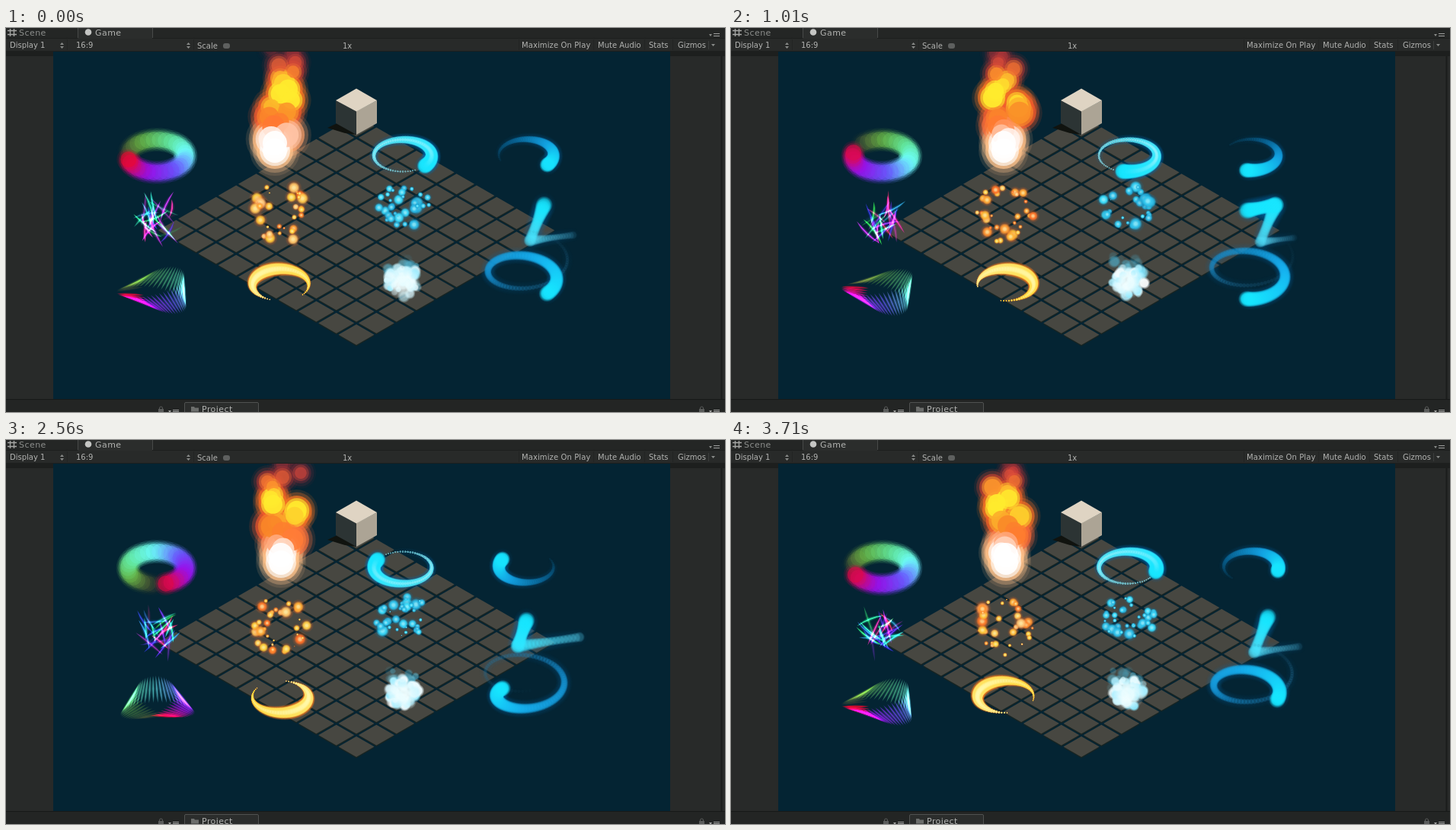
An HTML page with a canvas that plays this animation: 944 by 504 pixels, repeating every 3.81 s.

```html
<!DOCTYPE html>
<html lang="en">
<head>
<meta charset="utf-8">
<title>Particle effects</title>
<style>
html, body { margin: 0; width: 100%; height: 100%; overflow: hidden; background: #282a29; }
svg, canvas { position: absolute; left: 0; top: 0; width: 944px; height: 504px; display: block; }
text { font: 10px "DejaVu Sans", sans-serif; fill: #b2b3b1; }
.tab { font-size: 11px; letter-spacing: .45px; }
</style>
</head>
<body>
<svg viewBox="0 0 944 504">
  <rect width="944" height="504" fill="#282a29"/>
  <rect width="944" height="13" fill="#242625"/>
  <rect x="95" width="97" height="14" fill="#2b2d2c"/>
  <path d="M94.500 0V13M192.500 0V13" stroke="#484a49"/>
  <path d="M0 13.500H94M192 13.500H944" stroke="#1d1f1e"/>
  <rect y="30" width="944" height="7" fill="#1d1f1e"/>
  <path d="M939.500 37V488" stroke="#1b1d1c" stroke-width="2"/>
  <path d="M80.500 15V29M246.500 15V29M673.500 15V29M771.500 15V29M838.500 15V29M875.500 15V29" stroke="#222423"/>
  <path d="M5.500 1V11M10.500 1V11M2 3.500H14M2 8.500H14" stroke="#a8a9a7" stroke-width="1.300"/>
  <circle cx="108" cy="5.500" r="4.300" fill="#c5c6c4"/>
  <text class="tab" x="17" y="10" style="fill:#8d8f8d">Scene</text>
  <text class="tab" x="117" y="10">Game</text>
  <text x="5" y="26">Display 1</text>
  <text x="92" y="26">16:9</text>
  <text x="251" y="27">Scale</text>
  <text x="442" y="27">1x</text>
  <text x="677" y="26" letter-spacing=".1">Maximize On Play</text>
  <text x="777" y="26">Mute Audio</text>
  <text x="844" y="26">Stats</text>
  <text x="882" y="26">Gizmos</text>
  <path d="M71 22l2.500-3 2.500 3zm0 2h5l-2.500 3zM237 22l2.500-3 2.500 3zm0 2h5l-2.500 3zM926 21h5l-2.500 3zM923 8h4l-2 3z" fill="#888a88"/>
  <path d="M929 7.500H937M929 10.500H937" stroke="#a0a1a0"/>
  <path d="M922.500 17V28" stroke="#3c3e3d"/>
  <rect x="285" y="20" width="9" height="7" rx="3" fill="#5e605f"/>
  <rect x="62" y="31" width="810" height="456" fill="#042433"/>
  <g id="floor"></g>
  <path d="M422 131L439 123L460 131V140L445 138Z" fill="#10130f"/>
  <path d="M433 95L460 109V140L433 125Z" fill="#2c3434"/>
  <path d="M487 95L460 109V140L487 125Z" fill="#aca495"/>
  <path d="M460 79.500L487 95L460 109.500L433 95Z" fill="#dfd4c3"/>
  <rect y="487" width="944" height="17" fill="#232524"/>
  <path d="M0 487.500H944" stroke="#171918"/>
  <path d="M234.500 504V493Q234.500 491.500 236 491.500H330Q331.500 491.500 331.500 493V504" fill="#2b2d2c" stroke="#505251"/>
  <path d="M243 497h4l1 1.500h5v5h-10z" fill="#6c6e6c"/>
  <text class="tab" x="257" y="504">Project</text>
  <g fill="none" stroke="#5a5c5b"><path d="M201.500 501V499a2 2 0 0 1 4 0V501M911.500 501V499a2 2 0 0 1 4 0V501"/></g>
  <path d="M200 500h7v4h-7zM910 500h7v4h-7z" fill="#5a5c5b"/>
  <path d="M213 502h4l-2 3zM923 502h4l-2 3z" fill="#a0a1a0"/>
  <path d="M219 501.500H227M219 503.500H227M929 501.500H937M929 503.500H937" stroke="#a0a1a0"/>
</svg>
<canvas width="944" height="504"></canvas>
<script>
const LOOP = 3810, HOLD = 3710, RAD = Math.PI / 180;
const ctx = document.querySelector("canvas").getContext("2d");

// Floor tiles
let tiles = "";
for (let s = 0; s <= 18; s++) for (let i = Math.max(0, s - 9); i <= Math.min(9, s); i++) {
  const x = 460 + (2 * i - s) * 26.3, y = 129 + s * 15.2;
  const diamond = dy => `M${x - 23.5} ${y + dy}l23.5-13.5 23.5 13.5-23.5 13.5z`;
  tiles += `<path d="${diamond(1.3)}" fill="#182422"/><path d="${diamond(-.2)}" fill="#474741"/>`;
}
document.getElementById("floor").innerHTML = tiles;

const rnd = (a, b, c) => {
  const v = Math.sin(a * 127.1 + b * 311.7 + c * 74.7) * 43758.5453;
  return v - Math.floor(v);
};
const clamp = v => Math.max(0, Math.min(1, v));
const bump = u => Math.sin(Math.PI * u);
const mix = (a, b, u) => a.map((v, i) => v + (b[i] - v) * u);
const rgba = (c, a) => `rgba(${c.map(Math.round)},${a})`;

function ramp(stops, u) {
  const p = clamp(u) * (stops.length - 1), i = Math.min(stops.length - 2, Math.floor(p));
  return mix(stops[i], stops[i + 1], p - i);
}

const WHITE = [255, 255, 255], CYAN = [22, 230, 255], DEEP = [0, 105, 175];
const RAINBOW = [[238, 8, 40], [155, 15, 235], [105, 85, 255], [110, 255, 255], [100, 235, 160], [110, 190, 70], [90, 80, 50]];

function disc(x, y, r, fill) {
  ctx.fillStyle = fill;
  ctx.beginPath();
  ctx.arc(x, y, Math.max(r, .1), 0, 7);
  ctx.fill();
}

// Disc with a solid middle and a soft rim
function ball(x, y, r, c, a, hard = .6) {
  const g = ctx.createRadialGradient(x, y, 0, x, y, r);
  g.addColorStop(0, rgba(c, a));
  g.addColorStop(hard, rgba(c, a));
  g.addColorStop(1, rgba(c, 0));
  disc(x, y, r, g);
}

function lens(x, y, half, wide, angle, fill, bend = 0) {
  ctx.save();
  ctx.translate(x, y);
  ctx.rotate(angle);
  ctx.fillStyle = fill;
  ctx.beginPath();
  ctx.moveTo(-half, 0);
  ctx.quadraticCurveTo(0, bend - wide * 2, half, 0);
  ctx.quadraticCurveTo(0, bend + wide * 2, -half, 0);
  ctx.fill();
  ctx.restore();
}

function additive(paint) {
  ctx.globalCompositeOperation = "lighter";
  paint();
  ctx.globalCompositeOperation = "source-over";
}

// Dots left behind a circling head, oldest first
function trail(head, len, step, plot) {
  const off = head % step;
  for (let age = off + step * Math.floor((len - off) / step); age >= 0; age -= step) {
    const th = (head - age) * RAD;
    plot(Math.cos(th), Math.sin(th), age / len, age);
  }
}

// Calls plot for n endlessly reborn particles; u is the share of life spent
function pool(t, n, life, seed, plot) {
  for (let k = 0; k < n; k++) {
    const p = t / life + (k + .6 * rnd(k, seed, 9)) / n + 5, gen = Math.floor(p);
    plot(p - gen, i => rnd(k + seed, gen, i));
  }
}

function rainbowRing(head) {
  const dot = (c, s, u, r, a) => disc(198 + 38 * c, 168 + 21.5 * s, r, rgba(ramp(RAINBOW, u), a * (1 - .75 * u ** 4)));
  trail(head, 345, 12, (c, s, u) => dot(c, s, u, 15.5, .12));
  trail(head, 345, 12, (c, s, u) => {
    dot(c, s, u, 13, .22);
    dot(c, s, u, 10.5, .6);
  });
}

function rainbowFan(head) {
  additive(() => trail(head, 350, 7.5, (c, s, u, age) => {
    const x = 198 + 36 * c, y = 345 + 18 * s, a = .8 - .5 * u, tint = ramp(RAINBOW, u);
    lens(x, y, 18, 2.2, age / 2 * RAD, rgba(tint, a * .3));
    lens(x, y, 17, .9, age / 2 * RAD, rgba(tint, a * .8));
  }));
}

function scribble(t) {
  additive(() => pool(t, 26, 300, 3, (u, r) => {
    const x = 198 + 38 * (r(1) - .5), y = 252 + 36 * (r(2) - .5), half = 12 + 12 * r(5);
    const turn = 1.57 + (r(3) - .5) * 2.4 + u * .4, bend = (r(6) - .5) * 12;
    const hue = 130 + 225 * r(4), a = bump(u) ** .5;
    lens(x, y, half, 2.6, turn, `hsla(${hue},85%,50%,${.3 * a})`, bend);
    lens(x, y, half, 1, turn, `hsla(${hue},85%,62%,${.75 * a})`, bend);
  }));
}

function cyanRing(head) {
  const at = (c, s) => [521 + 38 * c, 167.5 + 21 * s];
  const size = u => 1.3 + 9.5 * (1 - u) ** 1.7;
  trail(head, 342, 5, (c, s, u) => ball(...at(c, s), size(u) + 4, DEEP, .25 * (1 - u)));
  trail(head, 342, 5, (c, s, u) => ball(...at(c, s), size(u), mix(CYAN, [150, 236, 248], u), .85 - .3 * u, .75));
  trail(head, 342, 5, (c, s, u) => ball(...at(c, s), size(u) * .45, WHITE, .25 * bump(u), .5));
}

function shortTrail(head) {
  const at = (c, s) => [683 + 36 * c, 166.5 + 20.5 * s];
  const tint = u => ramp([CYAN, [18, 160, 225], [8, 100, 150], [5, 55, 80]], u);
  trail(head, 245, 5, (c, s, u) => ball(...at(c, s), 15 - 10 * u, DEEP, .18 * (1 - u), .3));
  trail(head, 245, 5, (c, s, u) => ball(...at(c, s), 1.5 + 9 * (1 - u) ** 1.3, tint(u), .85 - .4 * u, .7));
}

// Older dots drift up and outward
function spiral(head) {
  const at = (c, s, age) => {
    const rx = 35 + 21 * (1 - Math.exp(-age / 170));
    return [683 + rx * c, 336 - .078 * age + rx * .57 * s];
  };
  const tint = u => ramp([CYAN, [22, 175, 240], [20, 140, 205], [35, 110, 150], [25, 80, 105]], u);
  trail(head, 490, 5, (c, s, u, age) => ball(...at(c, s, age), 15 - 8 * u, DEEP, .16 * (1 - u) ** 1.3, .3));
  trail(head, 490, 5, (c, s, u, age) => ball(...at(c, s, age), 2.5 + 8.5 * (1 - u) ** 1.9, tint(u), .8 * (1 - u) + .05, .6));
}

// Two corners are born per turn and swing opposite ways round one ellipse
function zigzag(phase) {
  const pts = [];
  const add = (p, born, life, angle) => {
    if (p >= born && p < born + life)
      pts.push({ born: p - born, pos: [709 + 44 * Math.cos(angle * RAD), 257 + 25 * Math.sin(angle * RAD)] });
  };
  for (let p = phase; p < 1080; p += 360) {
    add(p, 190, 570, 137 + .36 * p);
    add(p, 385, 540, 349 - .32 * p);
  }
  pts.sort((a, b) => a.born - b.born);
  pts.forEach((v, i) => v.age = i ? pts[i - 1].born : 0);
  for (const glow of [true, false]) for (let i = pts.length - 1; i > 0; i--) for (let u = 1; u >= 0; u -= .0625) {
    const [x, y] = mix(pts[i - 1].pos, pts[i].pos, u);
    const old = clamp((pts[i - 1].age + (pts[i].age - pts[i - 1].age) * u) / 400);
    if (glow) ball(x, y, 17 - 9 * old, DEEP, .16 * (1 - old), .3);
    else ball(x, y, 11.5 - 7 * old - 2 * bump(u), ramp([CYAN, [70, 230, 255], [90, 205, 235], [30, 105, 145]], old), .6 * (1 - old) + .06, .65);
  }
}

function goldRing(head) {
  const at = (c, s) => [360.5 + 37 * c, 337 + 21 * s];
  const size = u => 1 + 7.5 * bump(u ** 1.15) ** 1.6;
  trail(head, 292, 5.5, (c, s, u) => ball(...at(c, s), size(u) * 1.3, [245, 120, 25], .6, .6));
  trail(head, 292, 5.5, (c, s, u) => ball(...at(c, s), size(u), mix([255, 215, 50], [255, 236, 135], u), .9, .75));
  trail(head, 292, 5.5, (c, s, u) => ball(...at(c, s), size(u) * .55, [255, 255, 190], .4, .5));
}

// Short-lived dots around a round shell
function shell(t, n, seed, [cx, cy, rx, ry], rim, stops, core) {
  pool(t, n, 620, seed, (u, r) => {
    const th = r(1) * 6.28, d = .25 + .75 * Math.sqrt(r(2));
    const x = cx + rx * d * Math.cos(th), y = cy + ry * d * Math.sin(th) - 4 * u;
    const size = (2 + 7 * r(3)) * bump(u) ** .6;
    ball(x, y, size * 1.4, rim, .5, .45);
    ball(x, y, size, ramp(stops, r(4)), .95, .6);
    ball(x, y, size * .55, core, .65, .35);
  });
}

function cloud(t) {
  pool(t, 30, 520, 83, (u, r) =>
    ball(520 + 40 * (r(1) - .5), 331 - 26 * u + 20 * (r(2) - .5), 4 + 5 * r(3), mix([125, 225, 250], [60, 140, 165], u), .6 * bump(u)));
  pool(t, 50, 420, 97, (u, r) => {
    const th = r(1) * 6.28, d = Math.sqrt(r(2));
    ball(521 + 22 * d * Math.cos(th), 337 + 18 * d * Math.sin(th) - 12 * u, 4 + 5 * r(3), mix([125, 230, 255], WHITE, r(4)), bump(u) ** .5);
  });
  ball(521, 334, 22, [240, 254, 255], .9, .35);
}

const coreTint = [WHITE, [255, 120, 50], [250, 135, 40], [255, 235, 45], [255, 235, 45], [250, 135, 45], [215, 65, 60], [110, 38, 52]];
const haloTint = [[255, 195, 140], [245, 110, 60], [240, 85, 45], [245, 120, 35], [240, 105, 38], [190, 60, 50], [120, 42, 55], [55, 35, 48]];

// Rising puffs over a white-hot base, painted as flat nested contours
function fire(t) {
  const base = 353 + 8 * clamp((t - 700) / 500), blobs = [];
  pool(t, 17, 920, 31, (u, r) => blobs.push({ x: base + 4 + (r(1) - .5) * (26 + 26 * u), y: 148 - 124 * u, r: 17 - 9 * u + 4 * r(2), u }));
  for (const dy of [0, 10]) blobs.push({ x: base, y: 151 + dy, r: 20, u: 0 });
  blobs.sort((a, b) => b.u - a.u);
  const layer = (grow, alpha, tint) => blobs.forEach(b =>
    disc(b.x, b.y, b.r + grow * (1 - .3 * b.u), rgba(ramp(tint, b.u), alpha * clamp((1.1 - b.u) * 2.4))));
  layer(13, .13, haloTint);
  layer(9, .3, haloTint);
  layer(4, .7, haloTint);
  layer(0, .6, coreTint);
  layer(-4, .9, coreTint);
}

function draw(t) {
  const slow = .3868 * t, fast = 43 + .7693 * t;
  ctx.clearRect(0, 0, 944, 504);
  ctx.save();
  ctx.beginPath();
  ctx.rect(62, 31, 810, 456);
  ctx.clip();
  fire(t);
  rainbowRing(170 + slow);
  scribble(t);
  rainbowFan(170 + slow);
  cyanRing(fast);
  shortTrail(fast);
  shell(t, 34, 21, [360, 245, 37, 38], [240, 100, 30], [[255, 112, 40], [255, 165, 55], [255, 210, 60], [255, 195, 125]], [255, 245, 180]);
  shell(t, 38, 57, [521, 235, 36, 28], [10, 125, 175], [[45, 185, 230], [60, 225, 255]], [170, 245, 255]);
  goldRing(fast);
  cloud(t);
  zigzag(slow % 360);
  spiral(fast);
  ctx.restore();
}

function tick() {
  draw(Math.min(performance.now() % LOOP, HOLD));
  requestAnimationFrame(tick);
}
tick();
</script>
</body>
</html>
```
